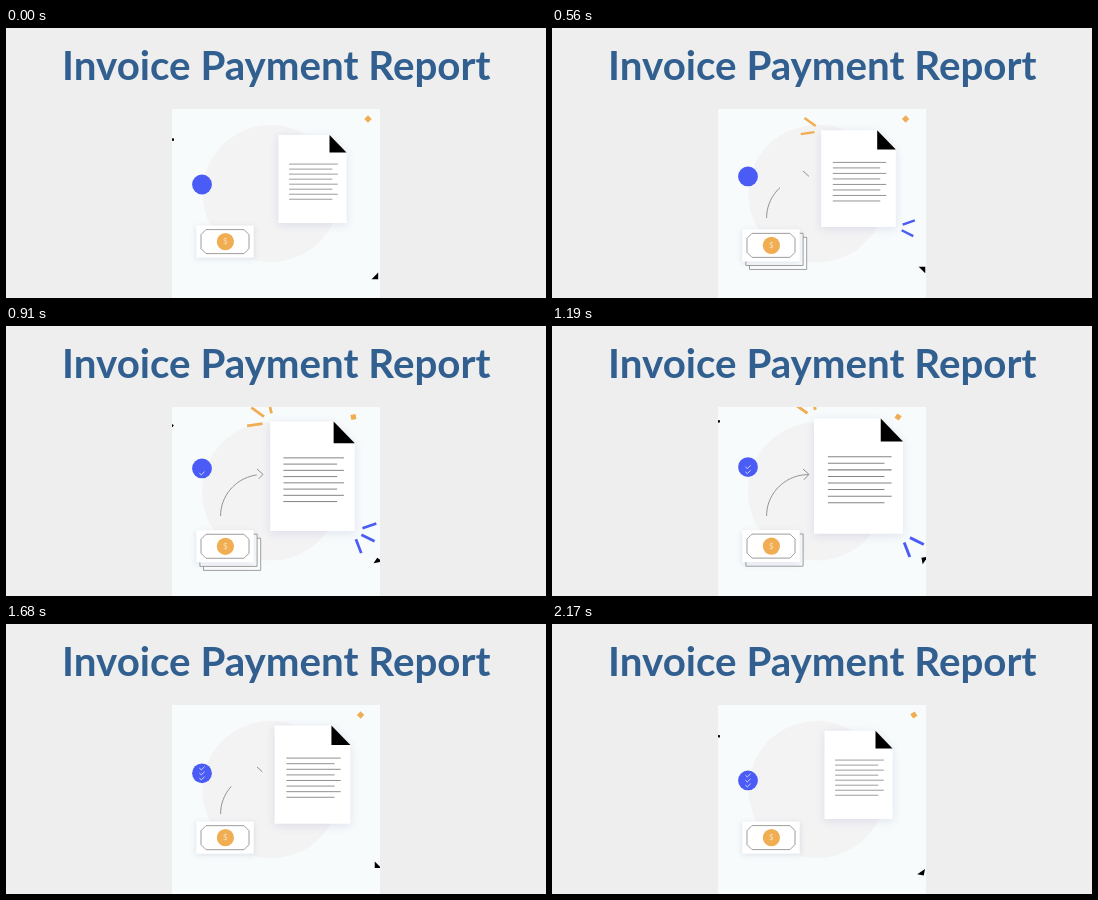
These frames come from a looping animation (540 px wide and 270 px high, 2240 ms). An HTML page with a canvas:

```html
<!DOCTYPE html>
<html lang="en">
<head>
<meta charset="utf-8">
<title>Invoice Payment Report</title>
<style>
html, body { margin: 0; width: 100%; height: 100%; overflow: hidden; background: #eee; }
canvas { display: block; width: 540px; height: 270px; }
</style>
</head>
<body>
<canvas id="stage"></canvas>
<script>
const W = 540, H = 270, LOOP = 2240, STEP = 70;
const BLUE = '#4a5cf5', ORANGE = '#f0ad52', GREY = '#848484';
const canvas = document.getElementById('stage');
const ctx = canvas.getContext('2d');
const dpr = window.devicePixelRatio || 1;
canvas.width = W * dpr;
canvas.height = H * dpr;

// Smooth monotone curve through [time, value] keys, flat at both ends.
function curve(keys) {
  const n = keys.length;
  const slope = i => (keys[i + 1][1] - keys[i][1]) / (keys[i + 1][0] - keys[i][0]);
  const tangent = keys.map((k, i) => {
    if (i === 0 || i === n - 1) return 0;
    const a = slope(i - 1), b = slope(i);
    return a * b > 0 ? 2 * a * b / (a + b) : 0;
  });
  return t => {
    let i = 0;
    while (i < n - 2 && t >= keys[i + 1][0]) i++;
    const [t0, v0] = keys[i], [t1, v1] = keys[i + 1];
    const d = t1 - t0, u = (t - t0) / d, u2 = u * u, u3 = u2 * u;
    return v0 * (2 * u3 - 3 * u2 + 1) + v1 * (3 * u2 - 2 * u3)
      + d * (tangent[i] * (u3 - 2 * u2 + u) + tangent[i + 1] * (u3 - u2));
  };
}

const drift = curve([[0, 0], [280, .06], [700, .74], [1140, 1], [1470, .85], [1890, .1], [2240, 0]]);
const grow = curve([[0, 0], [280, .03], [700, .5], [1160, 1], [1470, .77], [1890, .05], [2240, 0]]);
const lift = curve([[0, 0], [280, .2], [700, 5.5], [1050, 7], [1190, 6.5], [1470, .8], [1750, 0], [2240, 0]]);

const clamp = v => Math.max(0, Math.min(1, v));
const mix = (a, b, p) => a + (b - a) * p;

function poly(points, close) {
  ctx.beginPath();
  points.forEach(([x, y]) => ctx.lineTo(x, y));
  if (close) ctx.closePath();
}

function fillPoly(points, color) {
  poly(points, true);
  ctx.fillStyle = color;
  ctx.fill();
}

function stroke(color, width) {
  ctx.strokeStyle = color;
  ctx.lineWidth = width;
  ctx.stroke();
}

function disc(x, y, r, color) {
  ctx.beginPath();
  ctx.arc(x, y, r, 0, Math.PI * 2);
  ctx.fillStyle = color;
  ctx.fill();
}

function placed(x, y, angle, scale, draw) {
  ctx.save();
  ctx.translate(x, y);
  ctx.rotate(angle);
  ctx.scale(scale, scale);
  draw();
  ctx.restore();
}

function shadow(color, blur, y) {
  ctx.shadowColor = color;
  ctx.shadowBlur = blur * dpr;
  ctx.shadowOffsetY = y * dpr;
}

// Strokes the leading share p of a polyline.
function trimmed(points, p, color, width) {
  const len = i => Math.hypot(points[i + 1][0] - points[i][0], points[i + 1][1] - points[i][1]);
  let left = 0;
  for (let i = 0; i < points.length - 1; i++) left += len(i);
  left *= p;
  if (left < .5) return;
  const part = [points[0]];
  for (let i = 0; i < points.length - 1 && left > 0; i++) {
    const q = Math.min(1, left / len(i));
    part.push([mix(points[i][0], points[i + 1][0], q), mix(points[i][1], points[i + 1][1], q)]);
    left -= len(i);
  }
  poly(part, false);
  stroke(color, width);
}

const arc = Array.from({ length: 41 }, (_, i) => {
  const a = i / 40, b = 1 - a;
  const at = (p, q, r, s) => b * b * b * p + 3 * b * b * a * q + 3 * b * a * a * r + a * a * a * s;
  return [at(214.6, 214.6, 233.5, 256.5), at(190, 167, 148.6, 148.6)];
});

function drawArrow(p) {
  trimmed(arc, p, GREY, .9);
  trimmed([[251, 143], [257, 148.4], [251.8, 153.8]], p, GREY, .9);
}

function drawNotes(t, dy) {
  const behind = t < 210 ? 0 : t < 490 ? 1 : t < 1050 ? 2 : t < 1330 ? 1 : 0;
  for (let i = behind; i > 0; i--) {
    ctx.beginPath();
    ctx.rect(190.3 + 3.6 * i, 197.5 + dy + 4 * i, 57.2, 32.2);
    ctx.fillStyle = '#fafcfd';
    ctx.fill();
    stroke('#8a8a8a', .8);
  }
  placed(219, 213.6 + dy, 0, 1, () => {
    ctx.save();
    shadow('rgba(60,70,120,.14)', 6, 1.5);
    ctx.fillStyle = '#fff';
    ctx.fillRect(-28.7, -16.1, 57.4, 32.2);
    ctx.restore();
    const x = 24, y = 12, c = 5;
    poly([[c - x, -y], [x - c, -y], [x, c - y], [x, y - c], [x - c, y], [c - x, y], [-x, y - c], [-x, c - y]], true);
    stroke(GREY, .8);
    disc(.4, 0, 8.6, ORANGE);
    ctx.fillStyle = '#fae0b8';
    ctx.font = '8px Lato, sans-serif';
    ctx.textAlign = 'center';
    ctx.fillText('$', .4, 2.8);
  });
}

function drawBadge(t, p) {
  const y = mix(156.5, 141, p);
  disc(196, y, 9.9, BLUE);
  [560, 1000, 1540].forEach((start, i) => {
    const ty = y + 5 - 5 * i;
    trimmed([[193.4, ty - .2], [195.3, ty + 1.5], [198.6, ty - 1.7]],
      clamp((t - start) / 140), '#dfe2ff', .9);
  });
}

// Dashes beside two corners of the sheet, in sheet units.
const sparks = [
  { from: 140, to: 950, orange: [-52.6, -40.6, -40.2, -42.4], blue: [40.2, 41.8, 51.3, 38] },
  { from: 490, to: 1330, orange: [-49.2, -55.2, -39, -48], blue: [39.3, 47, 49.9, 52.3] },
  { from: 910, to: 1680, orange: [-35.6, -62.4, -33, -50.6], blue: [34.9, 50.7, 39.2, 61.8] }
];

function drawSheet(t) {
  const g = grow(t);
  placed(306.5, 150.9 - .8 * g, 0, 1 + .31 * g, () => {
    for (const s of sparks) {
      if (t < s.from || t >= s.to) continue;
      for (const [x0, y0, x1, y1, color] of [[...s.orange, ORANGE], [...s.blue, BLUE]]) {
        poly([[x0, y0], [x1, y1]], false);
        stroke(color, 2.2);
      }
    }
    ctx.save();
    shadow('rgba(60,70,150,.13)', 10, 2);
    fillPoly([[-34, -44], [17, -44], [34, -26.5], [34, 44], [-34, 44]], '#fff');
    ctx.restore();
    fillPoly([[17, -44], [34, -26.5], [17, -26.5]], '#000');
    for (let i = 0; i < 8; i++) {
      const y = -14.8 + 5.02 * i;
      poly([[-23.4, y], [i % 2 ? 19.8 : 25.3, y]], false);
      stroke(GREY, .8);
    }
  });
}

function drawConfetti(p, turn) {
  placed(mix(362, 346, p), 91, turn + Math.PI / 4, 1, () => {
    ctx.fillStyle = ORANGE;
    ctx.fillRect(-2.6, -2.6, 5.2, 5.2);
  });
  placed(mix(370, 372, p), mix(249, 233.5, p), turn, 1, () =>
    fillPoly([[2.2, 2.2], [2.2, -4.4], [-4.4, 2.2]], '#000'));
  placed(163, mix(111.6, 96, p), turn, 1, () => {
    ctx.fillStyle = '#000';
    ctx.fillRect(-5, -1.2, 10, 2.4);
  });
}

function draw(t) {
  const p = drift(t);
  ctx.setTransform(dpr, 0, 0, dpr, 0, 0);
  ctx.fillStyle = '#eee';
  ctx.fillRect(0, 0, W, H);
  ctx.fillStyle = '#315f90';
  ctx.font = 'bold 40.3px Lato, Carlito, sans-serif';
  ctx.textAlign = 'center';
  ctx.fillText('Invoice Payment Report', 270.3, 52);

  ctx.save();
  ctx.beginPath();
  ctx.rect(166, 81, 208, 189);
  ctx.clip();
  ctx.fillStyle = '#f7fbfc';
  ctx.fillRect(166, 81, 208, 189);
  disc(265, 165.5, 68.5 + .5 * p, '#f3f3f4');
  drawArrow(p);
  drawBadge(t, p);
  drawNotes(t, lift(t));
  drawSheet(t);
  drawConfetti(p, -t / LOOP * Math.PI * 2);
  ctx.restore();
}

const begin = performance.now();
function tick() {
  const t = (performance.now() - begin) % LOOP;
  draw(Math.floor(t / STEP) * STEP);
  requestAnimationFrame(tick);
}
tick();
</script>
</body>
</html>
```
